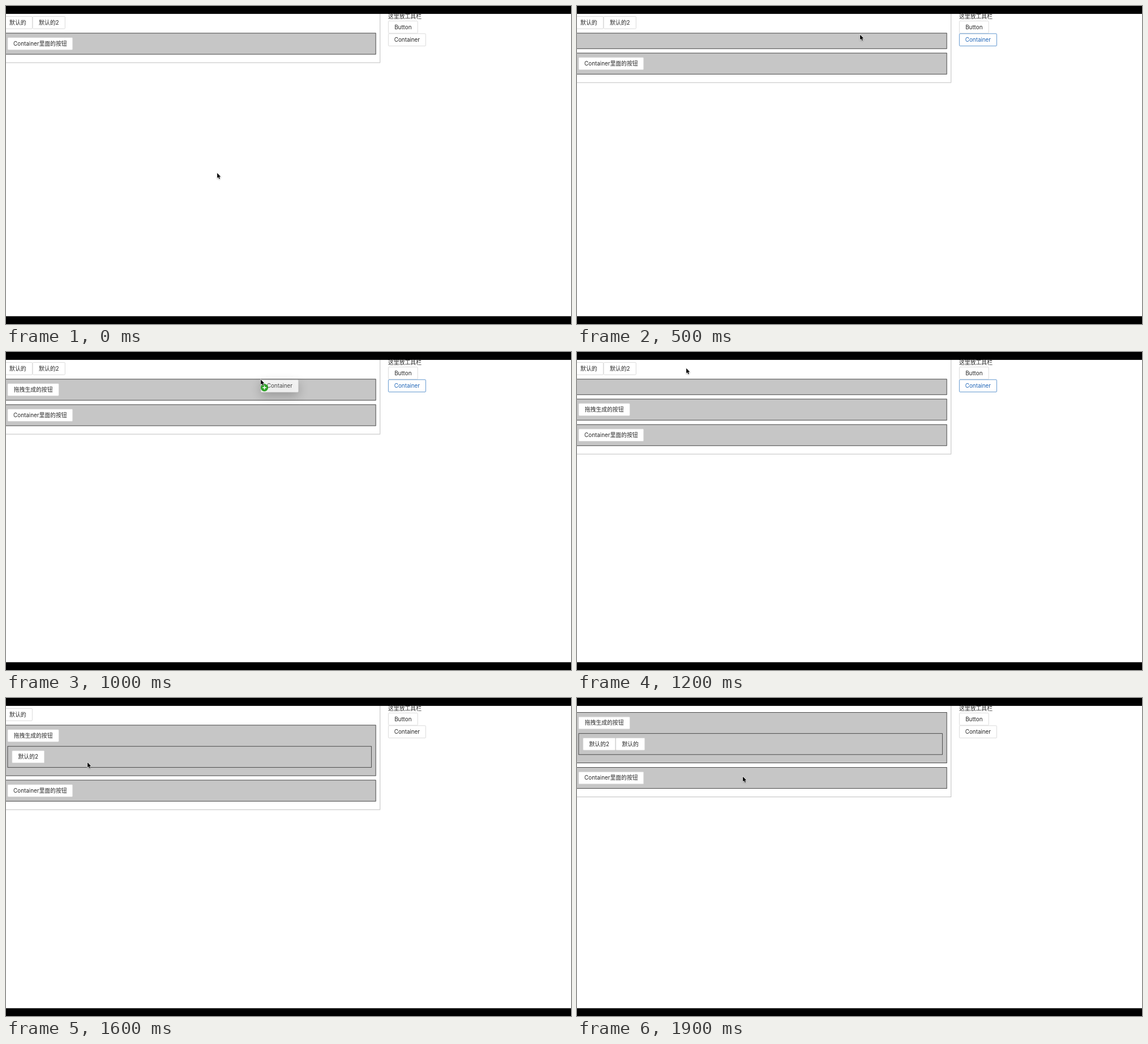
An HTML page with a canvas that plays this animation: 998 by 561 pixels, repeating every 2000 ms.

```html
<!DOCTYPE html>
<html lang="zh-CN">
<head>
<meta charset="utf-8">
<title>拖拽布局</title>
<style>
  html, body { margin: 0; width: 100%; height: 100%; overflow: hidden; background: #fff; }
  canvas { display: block; }
</style>
</head>
<body>
<canvas id="stage" width="998" height="561"></canvas>
<script>
const ctx = document.getElementById('stage').getContext('2d');
const STEP = 100, BUTTON_H = 22.5, GAP = 7.03, INSET = 7.73, EMPTY_H = 28.1, BORDER = .8;
const LEFT = -5.2, TOP = 18, RIGHT = 653.5;
const FONT = '9.84px Inter, "Noto Sans CJK SC", "Noto Sans CJK", sans-serif';

const ONE = '默认的', TWO = '默认的2', INNER = 'Container里面的按钮', MADE = '拖拽生成的按钮';
const WIDTHS = { [ONE]: 52, [TWO]: 57.9, [INNER]: 115.6, [MADE]: 91.2, Button: 52.6, Container: 66.8 };

// Strings are buttons, arrays are containers.
const inner = [INNER], made = [MADE], empty = [], second = [TWO];
const start = [ONE, TWO, inner];
const oneAdded = [ONE, TWO, empty, inner];
const filled = [ONE, TWO, made, inner];
const twoAdded = [ONE, TWO, empty, made, inner];
const moved = [ONE, second, made, inner];
const nested = [ONE, [MADE, second], inner];
const finished = [[MADE, [TWO, ONE]], inner];

// One entry per step: cursor x, y, tree, highlighted button, dragged item, drop target
const steps = [
  [373, 294, start],
  [610, 140, start],
  [699, 58, start, 'Container'],
  [430, 66, start, 'Container', 'Container'],
  [183, 69, start, 'Container', 'Container', inner],
  [500, 50, oneAdded, 'Container'],
  [240, 52, oneAdded, 'Button', 'Button', empty],
  [119, 55, filled, 'Button'],
  [430, 58, filled, 'Button'],
  [699, 58, filled, 'Container'],
  [450, 48, filled, 'Container', 'Container'],
  [215, 40, filled, 'Container', 'Container', made],
  [193, 28, twoAdded, 'Container'],
  [105, 50, twoAdded, TWO, TWO, empty],
  [126, 64, moved],
  [139, 100, moved, null, second, made],
  [144, 113, nested],
  [24, 30, nested, ONE],
  [86, 94, nested, ONE, ONE, second],
  [293, 138, finished]
];

const isBox = Array.isArray;

function contentHeight(items) {
  const boxes = items.filter(isBox);
  const row = boxes.length < items.length ? BUTTON_H : 0;
  return boxes.reduce((sum, box) => sum + GAP + boxHeight(box), row) + (boxes.length ? GAP : 0);
}

function boxHeight(items) {
  return items.length ? contentHeight(items) + 2 * INSET : EMPTY_H;
}

function rect(x, y, w, h, color) {
  ctx.fillStyle = color;
  ctx.fillRect(x, y, w, h);
}

function text(label, x, y, color, align) {
  ctx.font = FONT;
  ctx.textAlign = align;
  ctx.fillStyle = color;
  ctx.fillText(label, x, y);
}

function drawButton(label, x, y, active) {
  const w = WIDTHS[label];
  ctx.beginPath();
  ctx.roundRect(x + BORDER / 2, y + BORDER / 2, w - BORDER, BUTTON_H - BORDER, 1.4);
  ctx.fillStyle = '#fff';
  ctx.fill();
  ctx.shadowColor = 'transparent';
  ctx.lineWidth = BORDER;
  ctx.strokeStyle = active ? '#3d7fc4' : '#d2d2d2';
  ctx.stroke();
  text(label, x + w / 2, y + BUTTON_H / 2 + 3.4, active ? '#2066b8' : '#262626', 'center');
}

function drawBox(items, x, y, right, active, target) {
  const w = right - x, h = boxHeight(items);
  rect(x, y, w, h, '#c6c6c6');
  ctx.shadowColor = 'transparent';
  ctx.lineWidth = BORDER;
  ctx.strokeStyle = '#2c2c2c';
  ctx.strokeRect(x + BORDER / 2, y + BORDER / 2, w - BORDER, h - BORDER);
  if (items === target) rect(x, y, w, 1.5, '#56b74c');
  drawItems(items, x + INSET, y + INSET, right - INSET, active, target);
}

function drawItems(items, left, y, right, active, target) {
  const buttons = items.filter(item => !isBox(item));
  let x = left;
  for (const label of buttons) {
    drawButton(label, x, y, label === active);
    x += WIDTHS[label];
  }
  if (buttons.length) y += BUTTON_H;
  for (const box of items.filter(isBox)) {
    y += GAP;
    drawBox(box, left, y, right, active, target);
    y += boxHeight(box);
  }
}

function drawToolbar(active) {
  text('这里放工具栏', 675, 21.6, '#262626', 'left');
  const tools = [['Button', 26], ['Container', 48.4]];
  tools.sort((a, b) => (a[0] === active) - (b[0] === active));
  for (const [label, y] of tools) drawButton(label, 675, y, label === active);
}

function drawGhost(item, x, y) {
  ctx.save();
  ctx.globalAlpha = .82;
  ctx.shadowColor = 'rgba(0,0,0,.3)';
  ctx.shadowBlur = 18;
  ctx.shadowOffsetY = 6;
  if (isBox(item)) drawBox(item, x, y, x + RIGHT - LEFT);
  else drawButton(item, x, y);
  ctx.restore();

  const cx = x + 6.5, cy = y + 14;
  ctx.beginPath();
  ctx.arc(cx, cy, 6.6, 0, 2 * Math.PI);
  ctx.fillStyle = '#2da326';
  ctx.fill();
  rect(cx - 3.4, cy - .75, 6.8, 1.5, '#fff');
  rect(cx - .75, cy - 3.4, 1.5, 6.8, '#fff');
}

function drawCursor(x, y) {
  const arrow = new Path2D('M0 0V8.8L2 6.9L3.4 10.2L4.9 9.6L3.5 6.4H6.2Z');
  ctx.save();
  ctx.translate(x + .1, y + .8);
  ctx.shadowColor = 'rgba(0,0,0,.3)';
  ctx.shadowBlur = 2;
  ctx.shadowOffsetY = 1;
  ctx.lineWidth = 1.2;
  ctx.strokeStyle = '#fff';
  ctx.stroke(arrow);
  ctx.shadowColor = 'transparent';
  ctx.fillStyle = '#000';
  ctx.fill(arrow);
  ctx.restore();
}

function draw(now) {
  const [x, y, tree, active, dragged, target] = steps[Math.floor(now / STEP) % steps.length];
  rect(0, 0, 998, 561, '#fff');

  const bottom = TOP + contentHeight(tree) + GAP;
  rect(0, bottom, 661.2, .9, '#b8b8b8');
  rect(660.3, 0, .9, bottom, '#b8b8b8');
  drawItems(tree, LEFT, TOP, RIGHT, active, target);
  drawToolbar(active);
  if (dragged) drawGhost(dragged, x, y + .8);
  drawCursor(x, y);

  rect(0, 0, 998, 13.9, '#000');
  rect(0, 547.3, 998, 14, '#000');
  requestAnimationFrame(draw);
}
requestAnimationFrame(draw);
</script>
</body>
</html>
```
